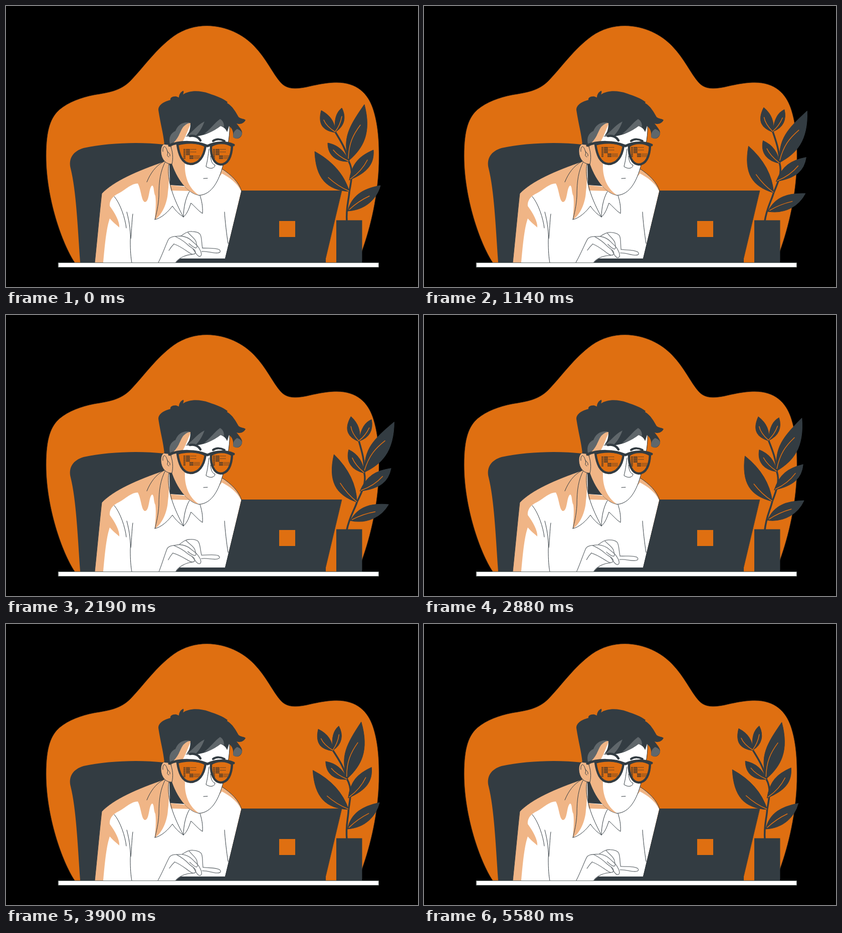
Animation of 822x562 px, one loop 5610 ms. Source, as an HTML page with a canvas:

```html
<!DOCTYPE html>
<html lang="en">
<head>
<meta charset="utf-8">
<title>Working late</title>
<style>
html, body { margin: 0; width: 100%; height: 100%; overflow: hidden; background: #000; }
canvas { display: block; }
</style>
</head>
<body>
<canvas id="stage" width="822" height="562"></canvas>
<script>
const ctx = document.getElementById('stage').getContext('2d');
const LOOP = 5610, STEP = 30;
const ORANGE = '#df6f11', DARK = '#333c42', SKIN = '#f0b586', GREY = '#60676b', WHITE = '#fff';

function fill(d, color) {
  ctx.fillStyle = color;
  ctx.fill(new Path2D(d));
}

function line(d, width = 1, color = DARK) {
  ctx.strokeStyle = color;
  ctx.lineWidth = width;
  ctx.lineCap = ctx.lineJoin = 'round';
  ctx.stroke(new Path2D(d));
}

function shape(d, color, edge = DARK, width = 1) {
  fill(d, color);
  line(d, width, edge);
}

function turn(x, y, degrees, draw) {
  ctx.save();
  ctx.translate(x, y);
  ctx.rotate(degrees * Math.PI / 180);
  ctx.translate(-x, -y);
  draw();
  ctx.restore();
}

function backdrop() {
  shape('M137 513C112 475 80 385 80 300C80 245 90 222 107 207C125 192 150 183 175 178' +
    'C205 173 228 170 248 150C275 122 300 85 335 60C355 46 378 39.5 401 39.5' +
    'C440 40 473 57 495 80C520 106 532 135 548 153C560 166 575 167 600 162' +
    'C630 155 645 153 660 153C700 153 722 175 732 205C742 235 745 270 744 315' +
    'C742 380 728 440 710 491L701 513Z', ORANGE, '#3a2a1c', .8);
  fill('M148 513C143 440 140 370 129 325C124 305 134 290 155 284C200 274 265 271 315 277' +
    'L330 330L190 380L180 513Z', DARK);
}

function body() {
  shape('M177 513C182 465 186 420 191 375C215 350 260 330 318 310L430 325' +
    'C450 338 464 352 470 370L437 505V513Z', SKIN);
  fill('M194 513C197 480 200 445 207 425C214 433 221 438 226 443C227 432 218 415 207 400' +
    'C206 390 212 380 226 374C240 366 250 355 263 355C270 368 270 390 277 392' +
    'C287 392 284 362 292 359C296 362 294 372 298 380C300 395 298 412 297 427' +
    'C310 420 322 395 323 372C326 350 325 330 325 318L400 370L431 335' +
    'C445 343 460 352 469 370L437 505V513Z', WHITE);
  fill('M326 314L342 320C350 340 360 352 370 361L327 358Z', DARK);
  fill('M327 358C345 361 370 359 392 379L366 370L329 369Z', SKIN);
  [
    'M325 316C321 340 328 375 354 422C347 417 340 412 332 400C325 410 310 425 297 427',
    'M318 311C308 330 305 350 305 380C304 400 300 415 297 427',
    'M281 352C288 335 298 320 315 311',
    'M354 422C354 405 358 384 366 371',
    'M354 422C362 415 365 405 369 394C376 400 384 410 392 415C393 400 390 388 387 379',
    'M216 381C228 395 238 425 240 444',
    'M241 412C247 435 249 455 248 470C248 490 249 503 251 513',
    'M253 416C251 430 251 445 249 465',
    'M436 412C437 430 440 455 443 475'
  ].forEach(d => line(d));
}

function face() {
  shape('M330 270L345 235L428 225L446 240C447 265 440 290 433 318C425 350 410 378 385 378.5' +
    'C362 375 340 345 330 312Z', WHITE);
  fill('M330 270L345 235L370 232C362 250 358 262 352 272L357 318C356 345 368 368 385 378' +
    'C362 375 340 345 330 312Z', SKIN);
  shape('M327 277C318 272 309 276 309 290C309 305 318 317 331 316C334 305 333 290 327 277Z', SKIN);
  line('M313 291C312 279 318 278 321 288C323 295 328 293 327 300M322 291C325 297 318 298 325 302');

  fill('M316 277C314 255 308 235 304 208C304 197 316 191 328 188C327 183 333 180 340 181' +
    'L345 183C345 177 349 171 354 169.5C355 172 354 175 353 177C365 169 385 168 405 175' +
    'C420 180 433 185 442 192L441 194C452 200 459 213 464 222C469 226 474 225 478 228' +
    'C474 236 466 237 460 235C468 245 472 250 471 256C468 267 458 267 453 262' +
    'C454 252 452 245 445 240C443 246 442 251 441 252C439 246 434 242 428 240' +
    'C412 252 397 258 384 260C375 262 367 260 361 258C367 252 368 242 368 234' +
    'C350 234 344 248 345 258C340 266 336 274 327 278Z', DARK);
  fill('M327 276C324 263 329 254 338 250C342 240 350 231 367 233C350 240 351 248 345 258C341 267 335 274 327 276Z', GREY);
  fill('M358 261C373 253 379 239 396 231C391 245 384 255 377 261Z', GREY);
  fill('M395 256C407 247 416 234 427 226C434 230 435 236 435 242L428 240C416 249 405 254 395 256Z', GREY);
  fill('M453 262C453 254 455 250 461 246C467 248 471 251 471 256C467 266 458 267 453 262Z', GREY);

  line('M367 260C377 258 385 263 388 269', 4.5);
  line('M413 270C420 265 429 266 436 270', 4);
  line('M405 286C403 300 402 310 399 321C407 327 417 325 417 318C412 317 409 311 408 300');
  line('M394 345L402 344.5');
}

function code(x, y) {
  ctx.fillStyle = 'rgba(45,48,50,.78)';
  for (let i = 0; i < 8; i++) {
    const top = y + i * 2.6, late = i > 4;
    ctx.fillRect(x, top, 4, 1.6);
    ctx.fillRect(x + (late ? 12 : 5), top, 8, 1.8);
    if (late || i % 2 === 0 && i < 4) {
      for (let k = 0; k < 4; k++) ctx.fillRect(x + (late ? 21 : 14) + k * 3, top + .3, 2.4, 1);
    }
  }
}

function glasses(sway) {
  const lenses = [
    ['M342 277C360 271 385 272 398 280C395 301 385 316 368 316C351 315 345 297 342 277Z', 354],
    ['M409 280C420 272 440 272 451 280C450 301 443 317 428 317C415 316 408 300 409 280Z', 413]
  ];
  for (const [d, x] of lenses) {
    fill(d, ORANGE);
    ctx.save();
    ctx.clip(new Path2D(d));
    code(x, 284.3 - 3.3 * sway);
    ctx.restore();
    line(d, 4.5);
  }
  line('M326 279C345 270 380 270 402 280C420 271 440 272 454 278', 5);
}

function laptop() {
  fill('M345 505H437L470 369H670L638 504V513H337C336 508 339 505 345 505Z', DARK);
  line('M470 369.5H670L638 504', .8, '#4a4038');
  ctx.fillStyle = ORANGE;
  ctx.fillRect(545, 430, 32, 32);
}

function hand(lift) {
  const ink = '#71777b';
  ctx.save();
  ctx.beginPath();
  ctx.rect(0, 0, 822, 513);
  ctx.clip();
  turn(336, 509, 3 - 12 * lift, () => {
    fill('M300 522L304 513C312 497 319 477 324 467C328 460 338 461 349 460C356 455 363 450 371 451' +
      'C378 451 386 453 388 458C391 465 390 474 392 484C403 485 416 483 425 487C430 491 427 494 420 494' +
      'C410 494 402 490 391 491C392 497 390 501 386 501C380 498 376 496 372 497' +
      'C360 497 347 503 340 511L332 522Z', WHITE);
    line('M300 522L304 513C312 497 319 477 324 467C328 460 338 461 349 460C356 455 363 450 371 451' +
      'C378 451 386 453 388 458C391 465 390 474 392 484', 1.3, ink);
    line('M392 484C403 485 416 483 425 487C430 491 427 494 420 494C410 494 402 490 391 491', 1.3, ink);
    line('M349 460C358 461 366 465 371 470C376 475 383 479 386 486C390 492 392 500 386 501C380 500 378 492 373 486', 1.3, ink);
    line('M363 453C371 462 376 464 379 471C380 477 383 482 379 484C373 483 370 479 365 475', 1.3, ink);
    line('M338 461C348 466 357 472 363 478C369 484 378 486 378 493C376 499 369 496 365 493C356 487 347 480 335 476', 1.3, ink);
    line('M335 476C331 480 328 484 325 489', 1.3, ink);
    line('M372 497C360 497 347 503 340 511L332 522', 1.3, ink);
  });
  ctx.restore();
}

const leaves = [
  ['M657 253C636 250 621 240 629 209C648 219 657 234 657 253Z', 'M657 252C646 245 638 238 634 228'],
  ['M657 252C654 225 660 212 670 204C679 222 676 240 657 252Z', 'M657 251C664 242 668 232 670 221'],
  ['M684 309C670 265 685 240 715 197C730 255 712 285 684 309Z', 'M683 305C684 275 692 258 707 238'],
  ['M684 311C660 312 642 300 642 274C662 278 676 290 684 311Z', 'M683 310C670 304 660 297 653 288'],
  ['M685 348C690 315 705 300 733 288C735 315 722 333 685 348Z', 'M687 346C703 335 713 324 721 308'],
  ['M685 371C640 368 618 345 616 291C650 310 674 335 685 371Z', 'M684 370C668 363 656 355 643 343'],
  ['M682 410C690 377 715 365 747 359C740 385 718 408 682 410Z', 'M685 407C699 394 710 387 725 380']
];

function plant(sway) {
  turn(680, 430, 10.5 * (sway + .5), () => {
    line('M680 432C678 402 684 390 685 371C690 345 693 328 684 311C679 288 668 270 657 252', 3.5);
    for (const [leaf, rib] of leaves) {
      shape(leaf, DARK);
      line(rib, 1.5, ORANGE);
    }
  });
  ctx.fillStyle = DARK;
  ctx.fillRect(659, 428.5, 51.5, 84.5);
}

function table() {
  ctx.fillStyle = WHITE;
  ctx.fillRect(104.5, 513.5, 639, 9);
  ctx.strokeStyle = '#65706c';
  ctx.lineWidth = 1;
  ctx.strokeRect(104.5, 513.5, 639, 9);
}

function render(t) {
  const wave = 2 * Math.PI * t / LOOP;
  const sway = Math.cos(wave - 2 * Math.PI / 3);
  const lift = .5 + .5 * Math.cos(4 * wave + 4 * Math.PI / 3);
  ctx.fillStyle = '#000';
  ctx.fillRect(0, 0, 822, 562);
  backdrop();
  body();
  face();
  glasses(sway);
  laptop();
  hand(lift);
  plant(sway);
  table();
}

const start = performance.now();
function tick() {
  const t = (performance.now() - start) % LOOP;
  render(Math.floor(t / STEP) * STEP);
  requestAnimationFrame(tick);
}
tick();
</script>
</body>
</html>
```
